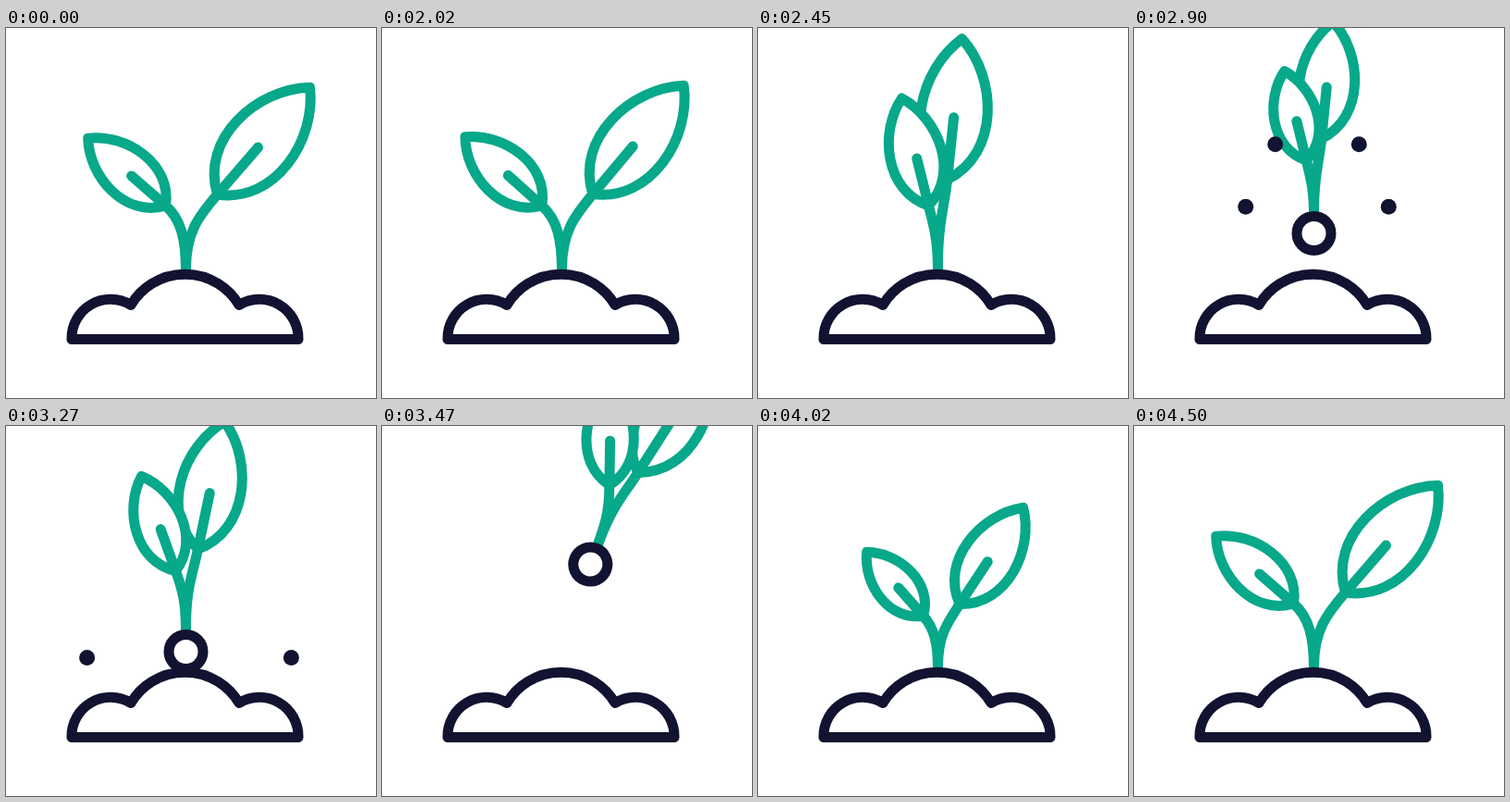
Recreate the animation shown at these times as an HTML page with a canvas. Size 400 by 400 pixels, loop 4.52 s.

```html
<!DOCTYPE html>
<html lang="en">
<head>
<meta charset="utf-8">
<title>Sprout</title>
<style>
  html, body { margin: 0; width: 100%; height: 100%; overflow: hidden; background: #fff; }
  canvas { display: block; width: 100vw; height: 100vh; }
</style>
</head>
<body>
<canvas id="stage" width="400" height="400"></canvas>
<script>
const LOOP = 4520, AXIS = 194.5;
const GREEN = '#08a88a', DARK = '#121331';
const ctx = document.getElementById('stage').getContext('2d');
const mound = new Path2D('M71 336.5A42 42 0 0 1 135 299.5A68 68 0 0 1 252 299.5A42 42 0 0 1 316 336.5Z');

const linear = p => p;
const smooth = p => p * p * (3 - 2 * p);
const soft = p => (p + smooth(p)) / 2;
const easeOut = p => 1 - (1 - p) ** 2;
const grow = p => 1 - (1 - p) ** 2.4;
const launch = p => p ** 1.6;

const mix = (a, b, p) => a + (b - a) * p;
const ramp = (t, from, to, ease = linear) =>
  ease(Math.min(1, Math.max(0, (t - from) / (to - from))));

// A stem from the seed at (0, 0) to the leaf base, the leaf, and its vein
function leaf(bx, by, angle, len) {
  const r = angle * Math.PI / 180, ux = Math.sin(r), uy = -Math.cos(r);
  const at = (along, side) => [
    bx + (ux * along - uy * side) * len,
    by + (uy * along + ux * side) * len
  ];
  ctx.beginPath();
  ctx.moveTo(bx, by);
  ctx.bezierCurveTo(...at(.22, .35), ...at(.75, .277), ...at(1, 0));
  ctx.bezierCurveTo(...at(.75, -.277), ...at(.22, -.35), bx, by);
  ctx.fill();
  ctx.stroke();

  ctx.beginPath();
  ctx.moveTo(0, 0);
  ctx.lineTo(0, by * .25);
  ctx.bezierCurveTo(0, by * .62, ...at(-.2, 0), bx, by);
  ctx.lineTo(...at(.44, 0));
  ctx.stroke();
}

// fold: 0 = leaves spread, 1 = leaves upright
function plant(x, y, tilt, fold, size, hasSeed) {
  ctx.save();
  ctx.translate(x, y);
  ctx.rotate(tilt * Math.PI / 180);
  ctx.fillStyle = '#fff';
  ctx.strokeStyle = GREEN;
  leaf(size * mix(34, 6, fold), size * mix(-107, -126, fold), mix(40.8, 0, fold), size * 153);
  leaf(size * mix(-22, -8, fold), size * -95, mix(-49, -8, fold), size * mix(111, 121, fold));
  if (hasSeed) {
    ctx.strokeStyle = DARK;
    ctx.beginPath();
    ctx.arc(0, 0, 18.5, 0, Math.PI * 2);
    ctx.fill();
    ctx.stroke();
  }
  ctx.restore();
}

function pulledPlant(t) {
  const rise = ramp(t, 2560, 2900, easeOut);
  const dip = ramp(t, 2900, 3270, smooth);
  const fly = ramp(t, 3270, 3700, launch);
  const fold = ramp(t, 2000, 2560, soft) - .29 * ramp(t, 2560, 3270);
  plant(AXIS + 104 * fly, 287 - 65 * rise + 22 * dip - 319 * fly,
    70 * fly, fold, 1 - .17 * rise + .09 * dip, true);
}

function newPlant(t) {
  const size = ramp(t, 3530, 4500, grow);
  plant(AXIS, mix(264, 287, size), 0, 1 - size, size, false);
}

// Two crumbs thrown outwards, mirrored; they fall behind the mound
function crumbPair(s, speed, drag, lift, gravity) {
  const dx = Math.min(115, speed * s - drag * s * s);
  const y = 285 - lift * s + gravity * s * s;
  if (s < 0 || y > 322) return;
  ctx.fillStyle = DARK;
  for (const side of [-1, 1]) {
    ctx.beginPath();
    ctx.arc(198 + side * dx, y, 8.5, 0, Math.PI * 2);
    ctx.fill();
  }
}

function draw(t) {
  ctx.fillStyle = '#fff';
  ctx.fillRect(0, 0, 400, 400);
  ctx.lineCap = ctx.lineJoin = 'round';
  ctx.lineWidth = 11;
  if (t < 3700) pulledPlant(t);
  if (t > 3530) newPlant(t);
  crumbPair(t - 2600, .139, -.000038, .917, .00129);
  crumbPair(t - 2600, .347, .0003, .943, .00212);
  ctx.fillStyle = '#fff';
  ctx.strokeStyle = DARK;
  ctx.fill(mound);
  ctx.stroke(mound);
}

const start = performance.now();
function tick() {
  draw((performance.now() - start) % LOOP);
  requestAnimationFrame(tick);
}
tick();
</script>
</body>
</html>
```
